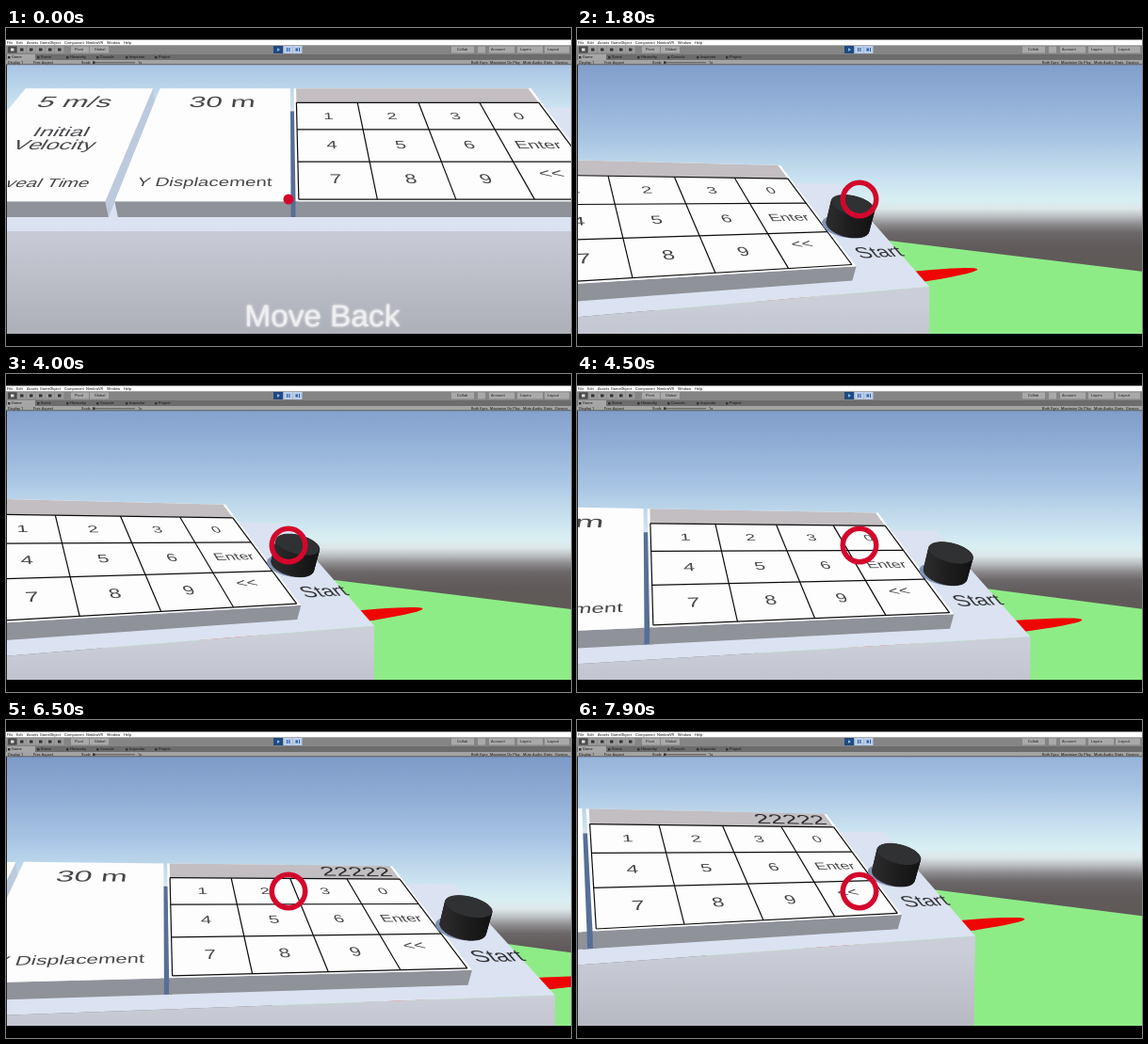
An HTML page with a canvas for the animation above (8 s loop, 600 by 338 pixels).

```html
<!DOCTYPE html>
<html lang="en">
<head>
<meta charset="utf-8">
<title>Console view</title>
<style>
  html, body { margin: 0; width: 100%; height: 100%; overflow: hidden; background: #000; }
  canvas { display: block; width: 600px; height: 338px; }
</style>
</head>
<body>
<canvas id="stage" width="600" height="338"></canvas>
<script>
const ctx = document.getElementById('stage').getContext('2d');
const LOOP = 8000, STEP = 100;
const FOCAL = 650, CX = 300, CY = 182;
const SANS = '"Liberation Sans", Arial, sans-serif';
const UI = 'Roboto, "Open Sans", sans-serif';
const RED = '#d4062c';

// time, yaw, pitch down (degrees)
const LOOK = [
  [0, 0, 7.19], [100, 0, 7.19], [1000, 28.13, -.75], [1900, 28.7, .3],
  [2900, 28.4, 1.1], [3200, 27.5, 1.15], [3500, 27.5, 1.15], [3600, 27.4, 1.05],
  [3800, 27.4, 1.05], [4000, 27.2, .91], [5000, 12, -.6], [5400, 11.35, -.68],
  [6000, 11.6, -.6], [6400, 11.6, -.6], [6600, 11.8, -.5], [7000, 11.8, -.5],
  [7200, 17.72, 1.7], [7900, 24.4, 4.32]
];
const TYPED = [5300, 5600, 5800, 6000, 6500];
const ENTER_OFF = [[2000, 3500], [4900, 6000]];

const rad = d => d * Math.PI / 180;
let sy, cy, sp, cp;

function aim(t) {
  let i = LOOK.findIndex(k => k[0] > t);
  if (i < 0) i = LOOK.length - 1;
  const a = LOOK[i - 1], b = LOOK[i];
  const k = Math.min(1, (t - a[0]) / (b[0] - a[0]));
  const e = k * k * (3 - 2 * k);
  const yaw = rad(a[1] + (b[1] - a[1]) * e), pitch = rad(a[2] + (b[2] - a[2]) * e);
  sy = Math.sin(yaw); cy = Math.cos(yaw);
  sp = Math.sin(pitch); cp = Math.cos(pitch);
}

function project([x, y, z]) {
  const h = x * sy + z * cy;
  const s = FOCAL / (h * cp - y * sp);
  return [CX + (x * cy - z * sy) * s, CY - (y * cp + h * sp) * s];
}

// Tilted desk: u across in key widths, v down in key rows, w above the panels
const ROW = .91;
const desk = (u, v, w = 0) => [u, .1025 - .4279 * v + .8824 * w, 9.746 - .8028 * v - .4703 * w];
const BASE = -.25, EDGE = 2.89, RIGHT = 5.32;
const onPanel = (u, v) => desk(u, v);
const onBase = (u, v) => desk(u, v, BASE);
const onFront = (u, v) => { const p = desk(u, EDGE, BASE); return [u, p[1] - v, p[2]]; };

function trace(points) {
  ctx.beginPath();
  points.forEach(p => ctx.lineTo(...project(p)));
}
function poly(points, fill) {
  trace(points);
  ctx.closePath();
  ctx.fillStyle = fill;
  ctx.fill();
}
function quad(plane, u0, u1, v0, v1, fill) {
  poly([plane(u0, v0), plane(u1, v0), plane(u1, v1), plane(u0, v1)], fill);
}
function line(a, b) {
  trace([a, b]);
  ctx.stroke();
}
function ring(n, at) {
  return Array.from({ length: n }, (_, i) => at(2 * Math.PI * i / n));
}

// Text on a plane, each letter set with the local slope of the projection
function label(plane, text, u, v, em, opt = {}) {
  const { align = .5, tall = 1.25, fill = '#48484b' } = opt;
  const d = .01;
  ctx.save();
  ctx.font = '100px ' + SANS;
  ctx.fillStyle = fill;
  ctx.textAlign = 'center';
  ctx.textBaseline = 'alphabetic';
  if (opt.glow) { ctx.shadowColor = '#fff'; ctx.shadowBlur = 3; }
  const k = em / 100, full = ctx.measureText(text).width * k;
  for (let i = 0; i < text.length; i++) {
    const before = ctx.measureText(text.slice(0, i)).width;
    const own = ctx.measureText(text[i]).width;
    const x = u - full * align + (before + own / 2) * k;
    const p = project(plane(x, v)), a = project(plane(x + d, v)), b = project(plane(x, v + d));
    const s = k / d;
    ctx.setTransform((a[0] - p[0]) * s, (a[1] - p[1]) * s,
      (b[0] - p[0]) * s * tall, (b[1] - p[1]) * s * tall, p[0], p[1]);
    ctx.fillText(text[i], 0, 36);
  }
  ctx.restore();
}

function sky() {
  const h = CY - FOCAL * sp / cp;
  const g = ctx.createLinearGradient(0, h - 160, 0, h + 80);
  [[-160, '#7a96c4'], [-110, '#8dabd4'], [-60, '#a9c5e4'], [-20, '#c8e1ef'], [4, '#d9eff3'],
   [13, '#dde7e9'], [21, '#bcc0c3'], [30, '#8c8a8d'], [39, '#6b6667'], [55, '#605a5a'], [80, '#5f5957']]
    .forEach(([y, c]) => g.addColorStop((y + 160) / 240, c));
  ctx.fillStyle = g;
  ctx.fillRect(0, 39, 600, 286);
}

function ground() {
  const G = -10;
  poly([[10, G, 8], [72, G, 8], [72, G, 400], [10, G, 400]], '#8eec87');
  const c = Math.cos(rad(15)), s = Math.sin(rad(15));
  poly(ring(48, a => {
    const p = 19.5 * Math.cos(a), q = 4.1 * Math.sin(a);
    return [36 + p * c - q * s, G, 62 + p * s + q * c];
  }), '#ee0606');
}

function base() {
  const top = project(desk(1, EDGE, BASE))[1];
  const g = ctx.createLinearGradient(0, top - 10, 0, top + 110);
  g.addColorStop(0, '#cbced9');
  g.addColorStop(1, '#adafb7');
  quad(onFront, -10, RIGHT, 0, 6, g);
  quad(onBase, -10, RIGHT, -.85, EDGE, '#dbe2f1');
  label(onFront, 'Move Back', .43, 1.09, .4, { tall: 1, fill: '#eeeef0', glow: true });
}

function slab(u0, u1) {
  const V0 = -1.1, V1 = 2.57;
  if (u1 < 0) poly([desk(u1, V0), desk(u1, V1), desk(u1, V1, BASE), desk(u1, V0, BASE)], '#bccade');
  poly([desk(u0, V1), desk(u1, V1), desk(u1, V1, BASE), desk(u0, V1, BASE)], '#909299');
  quad(onPanel, u0, u1, V0, V1, '#fdfdfe');
}

function panels() {
  quad(onBase, -.02, .13, -.7, 2.57, '#566f97');
  slab(-4.5, -2.32);
  slab(-2.2, .03);
  slab(.09, 4.15);
  label(onPanel, '5 m/s', -3.5, -.55, .49);
  label(onPanel, 'Initial', -3.42, .56, .355);
  label(onPanel, 'Velocity', -3.4, 1, .345);
  label(onPanel, 'Reveal Time', -3.34, 2.1, .255);
  label(onPanel, '30 m', -1.085, -.55, .487);
  label(onPanel, 'Y Displacement', -1.11, 2.07, .255);
}

function keypad(t) {
  const L = .13, R = 4.1, T = -.5, B = 2.52;
  quad(onPanel, L, R, -1.1, T, '#c2bec1');
  ctx.strokeStyle = '#0c0c0c';
  ctx.lineWidth = 1.2;
  for (const u of [L, 1.13, 2.13, 3.13, R]) line(desk(u, T), desk(u, B));
  for (const v of [T, .5, 1.52, B]) line(desk(L, v), desk(R, v));
  ['1230', '456', '789'].forEach((row, v) =>
    [...row].forEach((key, i) => label(onPanel, key, .63 + i, v, .28)));
  if (!ENTER_OFF.some(([a, b]) => t >= a && t < b)) label(onPanel, 'Enter', 3.63, 1, .277);
  label(onPanel, '<<', 3.55, 1.85, .28);
  const n = TYPED.filter(at => t >= at).length;
  if (n) label(onPanel, '2'.repeat(n), 4.03, -.83, .465, { align: 1, fill: '#2f2f31' });
}

function button() {
  const U = 4.77, V = .91, R = .365, H = .41;
  const disc = (w, du = 0) => ring(40, a => desk(U + du + R * Math.cos(a), V + R * Math.sin(a) / ROW, w));
  poly(disc(BASE, -.08), '#7f92b5');
  const low = disc(BASE), high = disc(BASE + H);
  const a = project(desk(U - R, V, 0))[0], b = project(desk(U + R, V, 0))[0];
  const g = ctx.createLinearGradient(a, 0, b, 0);
  g.addColorStop(0, '#2a2a2b');
  g.addColorStop(.5, '#1d1d1e');
  g.addColorStop(1, '#141415');
  poly(low, g);
  low.forEach((p, i) => {
    const j = (i + 1) % low.length;
    poly([p, low[j], high[j], high[i]], g);
    ctx.strokeStyle = g;
    ctx.lineWidth = .6;
    ctx.stroke();
  });
  poly(high, '#303133');
  label(onBase, 'Start', 4.96, 1.79, .39, { fill: '#333437' });
}

function reticle(t) {
  const k = Math.min(1, Math.max(0, (t - 600) / 500));
  const outer = 5.5 + 15 * k, inner = 15 * k;
  ctx.beginPath();
  ctx.arc(CX, CY, outer, 0, 2 * Math.PI);
  ctx.moveTo(CX + inner, CY);
  ctx.arc(CX, CY, inner, 0, 2 * Math.PI);
  ctx.fillStyle = RED;
  ctx.fill('evenodd');
}

function box(x, y, w, h, fill) {
  ctx.fillStyle = fill;
  ctx.fillRect(x, y, w, h);
}
function words(y, list, fill) {
  ctx.font = '4px ' + UI;
  ctx.textBaseline = 'middle';
  ctx.textAlign = 'left';
  ctx.fillStyle = fill;
  for (const [x, s] of list) ctx.fillText(s, x, y);
}

function chrome() {
  box(0, 0, 600, 13, '#000');
  box(0, 325, 600, 13, '#000');
  box(0, 39, 1, 286, '#222');
  box(0, 12.5, 600, 6, '#fff');
  words(15.6, [[1, 'File'], [11, 'Edit'], [22, 'Assets'], [36, 'GameObject'], [62, 'Component'],
    [85, 'NimbraVR'], [107, 'Window'], [125, 'Help']], '#111');

  box(0, 18.5, 600, 9.5, '#858585');
  for (let i = 0; i < 6; i++) {
    box(2 + i * 10, 19.5, 9.5, 7, i ? '#9c9c9c' : '#4a4a4a');
    box(5 + i * 10, 21.5, 3.5, 3, i ? '#333' : '#ddd');
  }
  for (const [x, w] of [[69, 19], [89, 20], [473, 24], [501, 8], [513, 27], [543, 27], [572, 26]])
    box(x, 19.5, w, 7, '#a9a9a9');
  words(23.3, [[73, 'Pivot'], [94, 'Global'], [479, 'Collab'], [515, 'Account'], [546, 'Layers'], [575, 'Layout']], '#222');
  [['#1f4a80', 284], ['#b9cdea', 294.5], ['#b9cdea', 304.5]].forEach(([c, x]) => box(x, 19, 10, 8, c));
  ctx.fillStyle = '#8fc0f5';
  ctx.beginPath();
  ctx.moveTo(288, 21.3); ctx.lineTo(291, 23); ctx.lineTo(288, 24.7);
  ctx.fill();
  box(298, 21, 1.2, 4, '#2f63a5');
  box(300.3, 21, 1.2, 4, '#2f63a5');
  box(307.5, 21.5, 2.5, 3, '#2f63a5');
  box(311, 21, 1, 4, '#2f63a5');

  box(0, 28, 600, 6, '#6c6c6c');
  box(1, 28, 30, 6, '#a6a6a6');
  words(31.2, [[6, 'Game'], [37, 'Scene'], [68, 'Hierarchy'], [100, 'Console'], [131, 'Inspector'], [162, 'Project']], '#151515');
  for (const x of [2, 33, 64, 96, 127, 158]) box(x, 30, 2.5, 2.5, '#333');

  box(0, 34, 600, 5, '#a3a3a3');
  box(0, 38.4, 600, .8, '#4d4d4d');
  words(36.5, [[2, 'Display 1'], [29, 'Free Aspect'], [80, 'Scale'], [140, '1x'], [494, 'Both Eyes'],
    [514, 'Maximize On Play'], [549, 'Mute Audio'], [571, 'Stats'], [583, 'Gizmos']], '#1a1a1a');
  box(92, 36.4, 45, .8, '#444');
  box(92, 35.4, 2.5, 2.5, '#333');
}

function draw(t) {
  aim(t);
  ctx.save();
  ctx.beginPath();
  ctx.rect(0, 39, 600, 286);
  ctx.clip();
  sky();
  ground();
  base();
  panels();
  keypad(t);
  button();
  reticle(t);
  ctx.restore();
  chrome();
}

const start = performance.now();
function tick() {
  const t = (performance.now() - start) % LOOP;
  draw(Math.floor(t / STEP) * STEP);
  requestAnimationFrame(tick);
}
tick();
</script>
</body>
</html>
```
